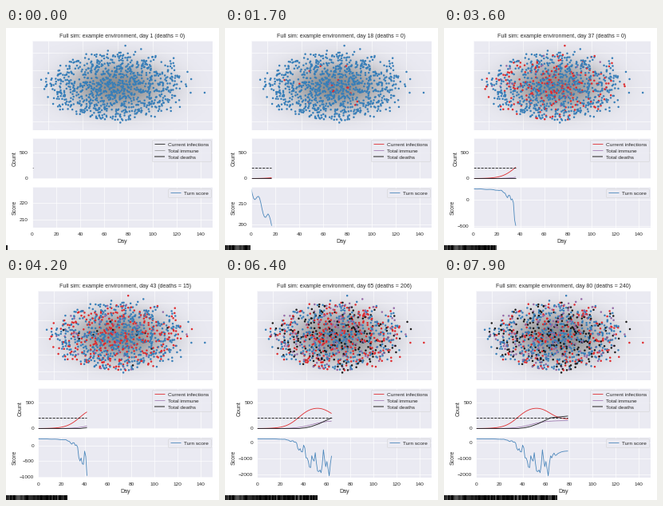
Recreate the animation shown at these times as a matplotlib script. Size 267 px wide and 278 px high, loop 8000 ms.

```python
import numpy as np
import matplotlib.pyplot as plt
from matplotlib.animation import FuncAnimation
from matplotlib.patches import Rectangle

W, H, DPI = 267, 278, 64
DAYS, SPAN = 80, 150
PT = 72 / DPI  # points per pixel
BLUE, RED, PURPLE, BLACK = "#377eb8", "#df2a2d", "#9467a6", "#1a1a1a"
RIGHT = 259

plt.rcParams.update({
    "font.family": "Liberation Sans",
    "font.size": 6.5 * PT,
    "text.color": "#262626",
    "axes.labelcolor": "#262626",
    "axes.facecolor": "#eaeaf2",
    "axes.edgecolor": "white",
    "axes.linewidth": 0.7,
    "axes.labelsize": 7.05 * PT,
    "axes.titlesize": 7.05 * PT,
    "axes.titlepad": 4,
    "axes.labelpad": 2.8,
    "axes.grid": True,
    "axes.axisbelow": True,
    "grid.color": "white",
    "grid.linewidth": 0.7,
    "xtick.labelsize": 6.45 * PT,
    "ytick.labelsize": 6.45 * PT,
    "xtick.color": "#262626",
    "ytick.color": "#262626",
    "xtick.major.size": 0,
    "ytick.major.size": 0,
    "xtick.major.pad": 6.7,
    "ytick.major.pad": 5.6,
    "legend.fontsize": 6.45 * PT,
    "legend.borderaxespad": 0.38,
    "legend.handletextpad": 0.65,
    "legend.labelspacing": 0.4,
    "legend.fancybox": True,
})


def logistic(t, middle, width):
    return 1 / (1 + np.exp((middle - t) / width))


def infected(t):
    return 437 * logistic(t, 36, 5.8) - 260 * logistic(t, 63, 4.6)


def immune(t):
    return 152 * logistic(t, 47, 6.5)


def deaths(t):
    return np.interp(t, (36, 42, 47, 53, 64, 79), (0, 15, 42, 89, 206, 240))


def score(t):
    """Slow drift, then a loss that grows with the outbreak and swings."""
    swing = np.cos(2 * np.pi * (t - 6.5) / 8.5)
    jag = np.cos(2 * np.pi * (t - 42) / 3.333)
    calm = logistic(t, 66, 1.5)
    factor = 0.8 + (1 - calm) * (0.22 * jag - 0.3 * swing)
    loss = (infected(t) + deaths(t) / 3) ** 2 / 81 * factor
    return 217 - 0.95 * t + 2.5 * swing - np.minimum(loss, 35 * t + 150)


# Population: an elliptical cloud with a soft rim
rng = np.random.default_rng(7)
N = 1000
r = rng.random(N) ** 0.58
a = rng.random(N) * 2 * np.pi
pos = np.c_[138 + 84 * r * np.cos(a) + rng.normal(0, 8, N),
            73 + 42 * r * np.sin(a) + rng.normal(0, 4, N)]
pos = np.clip(pos, (42, 22), (236, 123))
pos[0] = 249, 81

order = np.argsort(0.1 * r + rng.random(N))
fate = rng.choice(3, N, p=(0.25, 0.17, 0.58))[order]
doomed, resistant, others = (order[fate == k] for k in range(3))


def agent_colors(t):
    colors = np.full(N, BLUE, dtype="<U7")
    sick = 0
    for group, total, lag, color in ((doomed, deaths, 6, BLACK),
                                     (resistant, immune, 7, PURPLE)):
        done, soon = int(total(t)), int(total(t + lag))
        colors[group[:soon]] = RED
        colors[group[:done]] = color
        sick += soon - done
    start = int(max(0, t - 40) * 6)
    colors[others[start:start + max(0, int(infected(t)) - sick)]] = RED
    return colors


fig = plt.figure(figsize=(W / DPI, H / DPI), dpi=DPI, facecolor="white")
rows = ((16, 128), (138, 189), (199, 250))
crowd, count, turn = axes = [fig.add_axes((0.1, 0.1 + 0.3 * k, 0.8, 0.2))
                             for k in range(3)]


def place(left):
    for ax, (top, bottom) in zip(axes, rows):
        ax.set_position((left / W, 1 - bottom / H,
                         (RIGHT - left) / W, (bottom - top) / H))


place(33)

# Contact haze behind the crowd
gx, gy = np.meshgrid(np.linspace(-2, 2, 120), np.linspace(-2, 2, 80))
haze = np.full(gx.shape + (4,), 0.52)
haze[..., 3] = 0.9 * np.exp(-np.hypot(gx, gy) ** 2.4)
crowd.imshow(haze, extent=(14, 264, 138, 8), aspect="auto", zorder=1.5)
dots = crowd.scatter(*pos.T, s=8, linewidths=0, zorder=2)
crowd.set(xlim=(33, 259), ylim=(128, 16),
          xticks=np.arange(53, 240, 43.6), yticks=np.arange(31, 120, 21.5))
crowd.tick_params(labelbottom=False, labelleft=False)

line = dict(lw=0.95, solid_capstyle="butt")
sick_line, = count.plot([], [], color=RED, label="Current infections", **line)
safe_line, = count.plot([], [], color=PURPLE, label="Total immune",
                        **{**line, "lw": 0.75})
dead_line, = count.plot([], [], color=BLACK, label="Total deaths", **line)
limit_line, = count.plot([], [], color=BLACK, lw=1, ls=(0, (3.5, 1.6)))
count.set(xlim=(0, SPAN), ylim=(-8, 776), yticks=(0, 500), ylabel="Count")
count.set_xticks(range(0, SPAN, 20))
count.tick_params(labelbottom=False)
legend = count.legend(loc="upper right")
legend.get_lines()[2].set(color="#6e6e6e", linewidth=1.8)

score_line, = turn.plot([], [], color="#4a86bb", label="Turn score", **line)
turn.set(xlim=(0, SPAN), ylabel="Score")
turn.set_xlabel("Day", labelpad=3.6)
turn.set_xticks(range(0, SPAN, 20))
for box in (legend, turn.legend(loc="upper right")):
    box.get_frame().set(linewidth=0.6)

# Progress strip along the bottom edge
step = W / SPAN
shades = 0.36 * rng.random(DAYS) ** 2.5
strip = [fig.add_artist(Rectangle((k * step, 0), step, 6, color=str(s), lw=0,
                                  antialiased=False, transform=None))
         for k, s in enumerate(shades)]


def update(i):
    days = np.arange(i + 1)
    crowd.set_title(f"Full sim: example environment, day {i + 1} "
                    f"(deaths = {int(deaths(i))})")
    dots.set_facecolor(agent_colors(i))

    sick_line.set_data(days, infected(days))
    safe_line.set_data(days, immune(days))
    dead_line.set_data(days, deaths(days))
    limit_line.set_data((0, max(i, 0.6)), (200, 200))
    keys = (RED, PURPLE) if i else ("#222222", "#888888")
    for key, color in zip(legend.get_lines(), keys):
        key.set_color(color)

    score_line.set_data(days, score(days))
    turn.relim()
    turn.autoscale(axis="y")
    turn.autoscale_view(scalex=False)

    # Keep the outermost axis label at a fixed margin
    place(33)
    box = turn.yaxis.get_tightbbox(fig.canvas.get_renderer())
    place(33 + 7.5 - box.x0)

    for k, bar in enumerate(strip):
        bar.set_visible(k <= i)
    return []


anim = FuncAnimation(fig, update, frames=DAYS, interval=100, repeat=True,
                     init_func=lambda: update(0))
plt.show()
```
